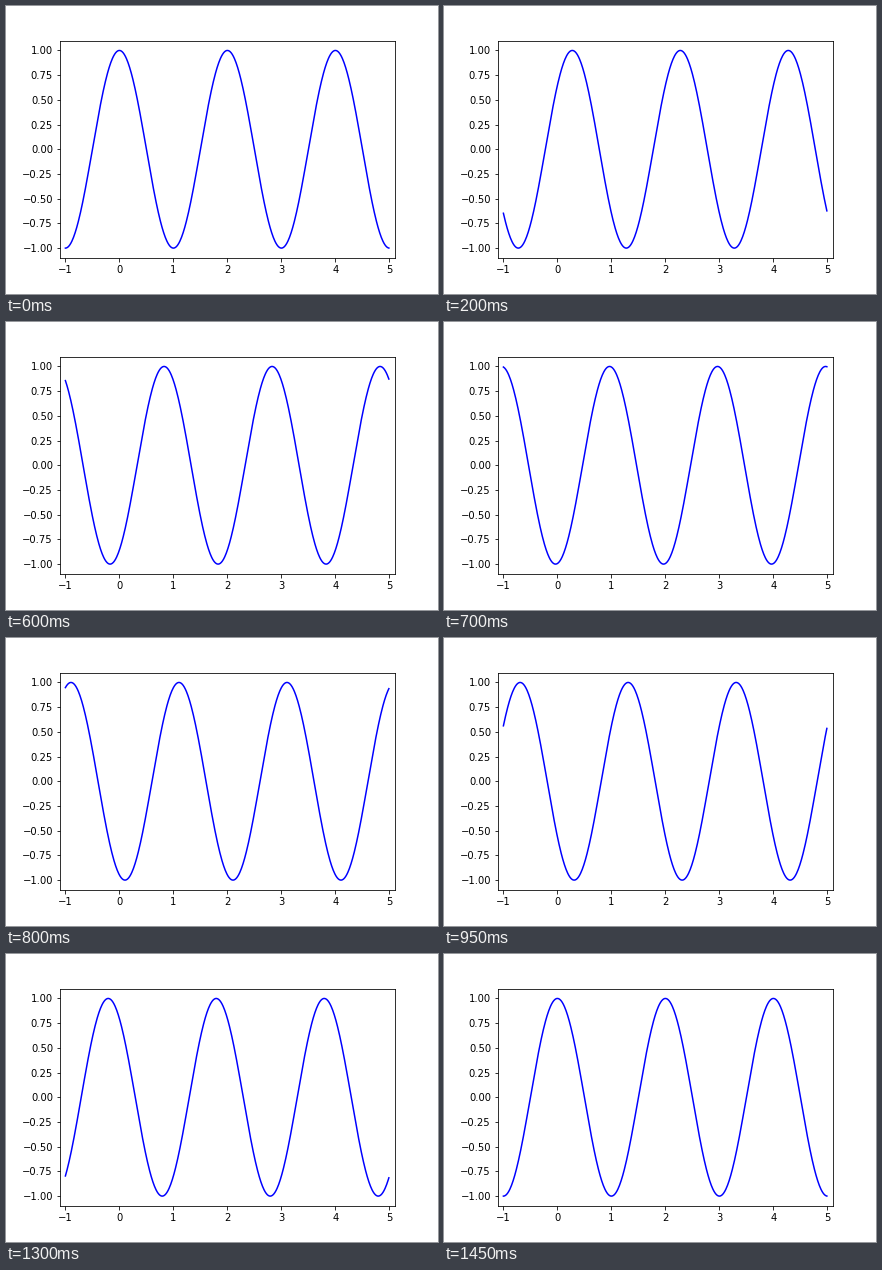
Write a matplotlib script that moves like this. It is 432x288 px and loops after 1.5 s.

```python
import numpy as np
import matplotlib.pyplot as plt
from matplotlib.animation import FuncAnimation

FRAMES = 30
INTERVAL = 50  # ms

plt.rcParams.update({"font.family": "DejaVu Sans", "font.size": 10})

fig, ax = plt.subplots(figsize=(6, 4), dpi=72, facecolor="white")
fig.subplots_adjust(left=0.125, right=0.9, bottom=0.125, top=0.88)
ax.set_xlim(-1.1, 5.1)
ax.set_ylim(-1.1, 1.1)
ax.set_xticks(np.arange(-1, 6))
ax.set_yticks(np.linspace(-1, 1, 9))

x = np.arange(-1, 5, 0.01)
phases = np.linspace(0, 2 * np.pi, FRAMES)  # both ends included: the wave rests at the seam
line, = ax.plot(x, np.cos(np.pi * x), color="b", linewidth=1.5)


def update(i):
    line.set_ydata(np.cos(np.pi * x - phases[i]))
    return line,


anim = FuncAnimation(fig, update, frames=FRAMES, interval=INTERVAL,
                     repeat=True, repeat_delay=0, blit=False)
plt.show()
```
